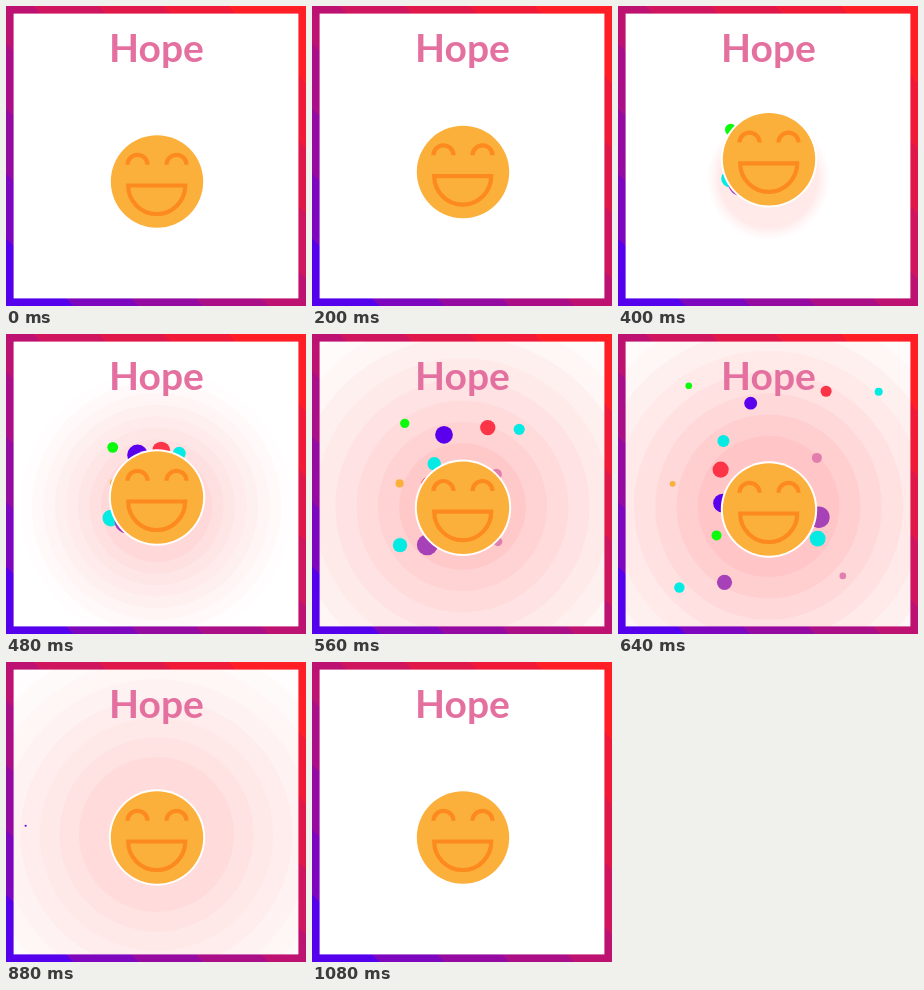
Write an HTML page with a canvas that moves like this. It is 300 px wide and 300 px high and loops after 1.92 s.

```html
<!DOCTYPE html>
<html lang="en">
<head>
<meta charset="utf-8">
<title>Hope</title>
<style>
html, body { margin: 0; width: 100%; height: 100%; overflow: hidden; background: #fff; }
canvas { display: block; width: 300px; height: 300px; }
</style>
</head>
<body>
<canvas id="stage" width="300" height="300"></canvas>
<script>
const ctx = document.getElementById('stage').getContext('2d');
const LOOP = 1920, STEP = 40, SIZE = 300, EDGE = 7.6;
const BURST_LIFE = 400;

const BLUE = '#5a00ec', RED = '#fb3447', GREEN = '#0cfa0c', CYAN = '#06eae4';
const PURPLE = '#a741b8', PINK = '#e17eae', ORANGE = '#fbb03b';

// colour, radius, start x, start y, travel x, travel y
const bursts = [
  { birth: 380, dots: [
    [BLUE, 11.1, 131.4, 130, 3, -144],
    [RED, 9.6, 146, 127, 147, -165],
    [GREEN, 5.8, 113, 124, -100, -171],
    [CYAN, 7, 158, 130, 243, -171],
    [CYAN, 9, 112.5, 172, -121, 193],
    [PURPLE, 13.1, 123.4, 176.5, -40, 170],
    [PINK, 5.7, 150, 176, 177, 156],
    [ORANGE, 5.1, 118, 149, -150, 2]
  ] },
  { birth: 500, dots: [
    [BLUE, 10.8, 118, 170, -109, -7],
    [RED, 9.2, 121.5, 154.5, -154, -154],
    [GREEN, 5.7, 118, 190, -159, 93],
    [CYAN, 6.9, 126, 135, -168, -229],
    [CYAN, 9, 177, 190, 185, 119],
    [PURPLE, 12.3, 181, 180, 162, 26],
    [PINK, 5.7, 181, 144, 146, -164],
    [ORANGE, 5, 150, 195, -3, 109]
  ] }
];

// diagonal border made of flat bands from blue to red
function bandedGradient() {
  const from = [85, 0, 236], to = [255, 29, 38], bands = 9;
  const edge = i => Math.min(1, Math.max(0, (3 + 65 * i) / 600));
  const gradient = ctx.createLinearGradient(0, SIZE, SIZE, 0);
  for (let i = 0; i < bands; i++) {
    const mix = Math.pow(i / (bands - 1), 0.7);
    const color = `rgb(${from.map((c, n) => Math.round(c + (to[n] - c) * mix))})`;
    gradient.addColorStop(i ? edge(i) : 0, color);
    gradient.addColorStop(i < bands - 1 ? edge(i + 1) : 1, color);
  }
  return gradient;
}
const border = bandedGradient();

// smooth 0..1 ramp between two times
function ramp(t, from, to) {
  const u = Math.min(1, Math.max(0, (t - from) / (to - from)));
  return u * u * (3 - 2 * u);
}

function disc(x, y, r, color) {
  ctx.fillStyle = color;
  ctx.beginPath();
  ctx.arc(x, y, r, 0, Math.PI * 2);
  ctx.fill();
}

function drawRipples(t) {
  const strength = ramp(t, 270, 630) * (1 - ramp(t, 720, 1080));
  if (strength <= 0) return;
  const inner = 48 + 29.5 * ramp(t, 330, 780);
  const gap = 23 * ramp(t, 360, 600) - 3.5 * ramp(t, 560, 720);
  for (let k = 7; k >= 0; k--) {
    const alpha = 0.0072 * (10 - k) * strength;
    disc(150.5, 172.5, inner + gap * k, `rgba(250, 77, 84, ${alpha})`);
  }
}

function drawBursts(t) {
  for (const { birth, dots } of bursts) {
    const u = (t - birth) / BURST_LIFE;
    if (u < 0 || u >= 1) continue;
    const q = u * u;
    for (const [color, r, x, y, dx, dy] of dots) {
      disc(x + dx * q, y + dy * q, r * (1 - q), color);
    }
  }
}

function drawTitle() {
  ctx.fillStyle = '#e4709f';
  ctx.font = '700 39px Lato, sans-serif';
  ctx.textAlign = 'center';
  ctx.textBaseline = 'alphabetic';
  ctx.fillText('Hope', 150.5, 55.7);
}

function drawFace(t) {
  const lift = 24 * (ramp(t, 80, 360) - ramp(t, 360, 600));
  ctx.save();
  ctx.translate(151, 175.5 - lift);
  disc(0, 0, 48.2, '#fff');
  disc(0, 0, 46.2, '#fbb03b');
  ctx.strokeStyle = '#fd8a1f';
  ctx.lineWidth = 4.2;
  for (const x of [-19.5, 19.5]) {
    ctx.beginPath();
    ctx.arc(x, -16.7, 10, Math.PI, 0);
    ctx.stroke();
  }
  ctx.beginPath();
  ctx.arc(-0.3, 4, 28.5, 0, Math.PI);
  ctx.closePath();
  ctx.stroke();
  ctx.restore();
}

function drawBorder() {
  ctx.strokeStyle = border;
  ctx.lineWidth = EDGE;
  ctx.strokeRect(EDGE / 2, EDGE / 2, SIZE - EDGE, SIZE - EDGE);
}

function draw(t) {
  ctx.fillStyle = '#fff';
  ctx.fillRect(0, 0, SIZE, SIZE);
  drawRipples(t);
  drawBursts(t);
  drawTitle();
  drawFace(t);
  drawBorder();
}

const start = performance.now();
function tick() {
  const t = (performance.now() - start) % LOOP;
  const held = Math.floor(t / STEP) * STEP;
  draw(held < 120 ? 0 : held);
  requestAnimationFrame(tick);
}
tick();
</script>
</body>
</html>
```
